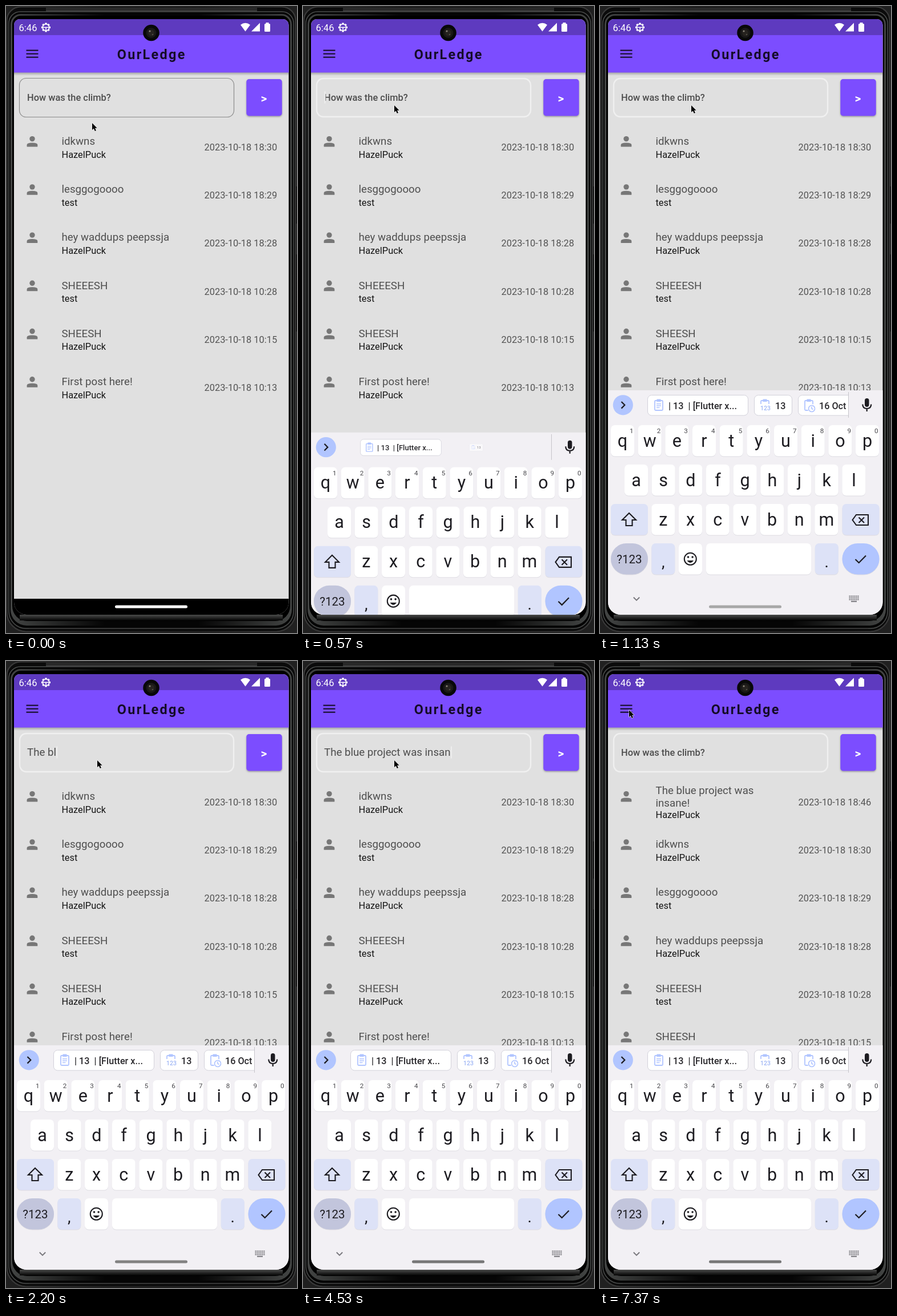
Animation of 510 by 1098 pixels, one loop 7.73 s. Source, as an HTML page with a canvas:

```html
<!DOCTYPE html>
<html lang="en">
<head>
<meta charset="utf-8">
<title>Climb feed</title>
<style>
html, body { margin: 0; width: 100%; height: 100%; overflow: hidden; background: #1d1d1d; }
canvas { display: block; width: 510px; height: 1098px; }
</style>
</head>
<body>
<canvas id="stage" width="510" height="1098"></canvas>
<script>
const ctx = document.getElementById('stage').getContext('2d');
const LOOP = 7730;
const PURPLE = '#7c4dff', INK = '#1d1c21', BLUE = '#b1c5ff', PALE = '#dde2f7';

const MESSAGE = 'The blue project was insane!';
const KEY_TIMES = [
  1500, 1600, 1700, 1800, 2000, 2200, 2300, 2400, 2530,
  2770, 2900, 3030, 3130, 3230, 3330, 3430, 3630, 3700,
  3800, 3900, 4030, 4170, 4270, 4370, 4430, 4500, 4700, 4900];
const CLEARED = 5770, POSTED = 5870, FOCUSED = 300;

const USER = 'HazelPuck';
const POSTS = [
  [['idkwns'], USER, '18:30'],
  [['lesggogoooo'], 'test', '18:29'],
  [['hey waddups peepssja'], USER, '18:28'],
  [['SHEEESH'], 'test', '10:28'],
  [['SHEESH'], USER, '10:15'],
  [['First post here!'], USER, '10:13']];
const NEW_POST = [['The blue project was', 'insane!'], USER, '18:46'];

const clamp = v => Math.max(0, Math.min(1, v));
const span = (t, from, to) => clamp((t - from) / (to - from));
const lerp = (a, b, p) => a + (b - a) * p;
const smooth = p => p * p * (3 - 2 * p);
const curve = (a, b, c, p) => [0, 1].map(i =>
  (1 - p) ** 2 * a[i] + 2 * p * (1 - p) * b[i] + p * p * c[i]);

function rect(x, y, w, h, fill) {
  ctx.fillStyle = fill;
  ctx.fillRect(x, y, w, h);
}

function box(x, y, w, h, r, fill, stroke, line = 1) {
  ctx.beginPath();
  ctx.roundRect(x, y, w, h, r);
  if (fill) { ctx.fillStyle = fill; ctx.fill(); }
  if (stroke) { ctx.strokeStyle = stroke; ctx.lineWidth = line; ctx.stroke(); }
}

function disc(x, y, r, fill) {
  ctx.beginPath();
  ctx.arc(x, y, r, 0, Math.PI * 2);
  ctx.fillStyle = fill;
  ctx.fill();
}

function path(d, x, y, scale, fill, stroke, line = 2) {
  ctx.save();
  ctx.translate(x, y);
  ctx.scale(scale, scale);
  const shape = new Path2D(d);
  if (fill) { ctx.fillStyle = fill; ctx.fill(shape); }
  if (stroke) { ctx.strokeStyle = stroke; ctx.lineWidth = line; ctx.stroke(shape); }
  ctx.restore();
}

function text(str, x, y, size, color, weight = 400, align = 'left') {
  ctx.font = `${weight} ${size}px Roboto, sans-serif`;
  ctx.textAlign = align;
  ctx.fillStyle = color;
  ctx.fillText(str, x, y);
}

function gradient(x0, y0, x1, y1, ...colors) {
  const g = ctx.createLinearGradient(x0, y0, x1, y1);
  colors.forEach((c, i) => g.addColorStop(i / (colors.length - 1), c));
  return g;
}

function drawPhone() {
  rect(0, 0, 510, 1098, '#202020');
  rect(506, 316, 4, 65, '#090909');
  rect(506, 435, 4, 135, '#090909');
  const rim = gradient(0, 0, 510, 0, '#3c3c3c', '#202020', '#202020', '#3c3c3c');
  box(1.5, 1.5, 506, 1094, [24, 24, 34, 34], '#0b0b0b', rim, 2);
  rect(70, 3, 370, 5, '#292929');
  rect(70, 8, 370, 1, '#484848');
  box(5, 10, 499, 1080, [20, 20, 30, 30], '#050505', '#4b4d4c', 1.5);
  box(8, 14, 493, 1071, [18, 18, 28, 28],
    gradient(8, 0, 501, 0, '#434544', '#050505', '#050505', '#434544'));
  box(11, 17, 487, 1060, [15, 15, 26, 26], '#000');
  rect(24, 1066, 461, 10, gradient(0, 1066, 0, 1076, '#4a4b4a', '#050505'));
  rect(40, 1089, 430, 2, '#363636');
}

function drawStatusBar() {
  rect(14, 23, 482, 28, '#5e3abf');
  text('6:46', 22.5, 44, 16.6, '#fff');

  ctx.save();
  ctx.translate(70, 37.5);
  for (let i = 0; i < 8; i++) {
    ctx.rotate(Math.PI / 4);
    rect(-1.7, -8, 3.4, 3, '#fff');
  }
  ctx.restore();
  ctx.beginPath();
  ctx.arc(70, 37.5, 5.7, 0, Math.PI * 2);
  ctx.strokeStyle = '#fff';
  ctx.lineWidth = 1.6;
  ctx.stroke();
  rect(65, 36.7, 10, 1.5, '#fff');
  rect(69.3, 37, 1.5, 5, '#fff');

  path('M411 33Q419.5 26.5 428 33L419.5 44.5Z', 0, 0, 1, '#fff');
  path('M445 29.5V44.5H430Z', 0, 0, 1, '#fff');
  box(453, 31, 10, 14, 1.5, '#fff');
  rect(455.5, 29, 5, 3, '#fff');
}

function drawAppBar() {
  rect(14, 116, 482, 6, gradient(0, 116, 0, 122, 'rgba(0,0,0,.28)', 'rgba(0,0,0,0)'));
  rect(14, 51, 482, 65.5, PURPLE);
  for (let i = 0; i < 3; i++) rect(35.5, 76.6 + i * 6, 21, 2.2, '#1a1030');
  ctx.letterSpacing = '2.34px';
  text('OurLedge', 255.3, 92.5, 23.4, '#150c28', 700, 'center');
  ctx.letterSpacing = '0px';
}

function drawCamera() {
  disc(254.5, 47, 14.3, '#080808');
  disc(254.5, 47, 9, '#191817');
  disc(254.5, 47, 5.5, '#26231f');
  disc(252, 44, 1.6, '#8a857a');
  disc(257, 50, 1.3, '#4d4b43');
}

function caretVisible(t, typed) {
  if (t >= CLEARED) return t >= POSTED && Math.floor((t - POSTED) / 500) % 2 === 0;
  if (typed) return t - KEY_TIMES[typed - 1] < 500;
  return t >= 330 && t < 800 || t >= 1300;
}

function drawComposer(t) {
  if (t < FOCUSED) box(23.5, 126.5, 376, 68, 11.7, null, '#8b8b8b', 1.2);
  else box(24, 127, 375, 67, 11.7, null, '#f0f0f0', 2.3);

  const typed = t < CLEARED ? KEY_TIMES.filter(k => k <= t).length : 0;
  const shown = MESSAGE.slice(0, typed);
  if (typed) text(shown, 37, 166, 18.7, '#4d4d4d');
  else text('How was the climb?', 37, 165.5, 16.4, '#4c4c4c', 500);
  if (caretVisible(t, typed)) {
    ctx.font = '400 18.7px Roboto, sans-serif';
    rect(37.3 + ctx.measureText(shown).width, 149.5, 2.2, 21, '#ededed');
  }

  ctx.save();
  ctx.shadowColor = 'rgba(0,0,0,.3)';
  ctx.shadowBlur = 3;
  ctx.shadowOffsetY = 1.5;
  box(421.3, 128, 62.4, 64.5, 4.7, PURPLE);
  ctx.restore();
  text('>', 452, 169, 21, '#fff', 700, 'center');
}

function drawPosts(t) {
  const posts = t >= POSTED ? [NEW_POST, ...POSTS] : POSTS;
  posts.forEach(([lines, user, time], i) => {
    const y = i * 84.24;
    disc(46, 232.6 + y, 4.7, '#777');
    path('M0 6V3.2Q0 0 8 0Q16 0 16 3.2V6Z', 36.6, 239.6 + y, 1.17, '#777');
    const tall = lines.length > 1;
    lines.forEach((line, n) => text(line, 97.5, (tall ? 233 : 242.8) + n * 22 + y, 18.7, '#4f4f4f'));
    text(user, 97.5, (tall ? 275 : 265.5) + y, 16.4, '#151515');
    text(`2023-10-18 ${time}`, 347.5, 253 + y, 16.4, '#545454');
  });
}

function drawClipboard(x, kind) {
  box(x - 7, 691, 14, 17, 1.5, null, BLUE, 1.8);
  rect(x - 3.5, 688.5, 7, 4.5, BLUE);
  if (kind === 'lines') for (let i = 0; i < 3; i++) rect(x - 4, 696 + i * 3.3, i < 2 ? 8 : 5.5, 1.5, BLUE);
  if (kind === 'digits') {
    rect(x - 9, 697, 20, 13, '#fff');
    text('123', x + 1, 708, 10.5, '#9fb6f5', 500, 'center');
  }
  if (kind === 'clock') {
    disc(x + 5, 704.5, 7.5, '#fff');
    path('M10.5 4.5A5.5 5.5 0 1 1 10.49 4.4M5 1.5V5L7.5 6.5', x, 700, 1, null, BLUE, 1.6);
  }
}

function drawChips(t) {
  const chips = [
    [83, 177, '| 13  | [Flutter x...', 120, 103, 'lines'],
    [270, 67, '13', 307, 289, 'digits'],
    [347, 109, '16 Oct', 384, 366, 'clock']];
  ctx.save();
  ctx.beginPath();
  ctx.rect(75, 673, 361, 52);
  ctx.clip();
  chips.forEach(([x, w, label, labelX, iconX, kind], i) => {
    const start = 476 + i * 60;
    const grow = 1 - (1 - span(t, start, start + 170)) ** 2;
    if (!grow) return;
    ctx.save();
    ctx.globalAlpha = Math.min(1, grow * 1.3);
    ctx.translate(x + w / 2, 699.3);
    ctx.scale(grow, grow);
    ctx.translate(-x - w / 2, -699.3);
    box(x + .5, 681.5, w - 1, 35.5, 7, '#fff', '#d2d1da');
    drawClipboard(iconX, kind);
    text(label, labelX, 705.5, 16.2, '#29282c', 500);
    ctx.restore();
  });
  ctx.restore();
}

function drawKey(cx, y, w, label, fill = '#fff', r = 7) {
  box(cx - w / 2, y + 1, w, 54.5, r, '#dddce2');
  box(cx - w / 2, y, w, 54.5, r, fill);
  if (label) text(label, cx, y + 37.5, 30.5, INK, 400, 'center');
}

function drawKeyboard(t) {
  const lift = 1 - (1 - span(t, 430, 760)) ** 3;
  if (!lift) return;
  const pitch = 47.67, w = 41;
  ctx.save();
  ctx.translate(0, 393 * (1 - lift));
  rect(14, 673, 482, 393, '#f2f0f4');

  disc(40.3, 698.8, 17.6, BLUE);
  path('M37.5 693L43.3 698.8L37.5 704.6', 0, 0, 1, null, INK, 2.2);
  drawChips(t);
  rect(435, 676, 1, 45, '#c6c5ca');
  box(464, 687, 7.5, 15, 3.75, INK);
  path('M460.3 697.5Q460.3 705 467.7 705Q475.2 705 475.2 697.5M467.7 705V710', 0, 0, 1, null, INK, 2.2);

  [...'qwertyuiop'].forEach((c, i) => {
    const x = 39.5 + i * pitch;
    drawKey(x, 734, w, c);
    text((i + 1) % 10, x + 15.8, 748.3, 11.7, '#46454a', 400, 'center');
  });
  [...'asdfghjkl'].forEach((c, i) => drawKey(63.5 + i * pitch, 803, w, c));
  [...'zxcvbnm'].forEach((c, i) => drawKey(110.8 + i * pitch, 872, w, c));

  drawKey(51.5, 872, 65, '', PALE);
  path('M51 888L63 900H56.5V910H45.5V900H39Z', 0, 0, 1, null, INK, 2.1);
  drawKey(457, 872, 65, '', PALE);
  path('M449 891H470V909H449L442.5 900ZM453.5 895.5L463 905M463 895.5L453.5 905', 0, 0, 1, null, INK, 2.1);

  drawKey(51.5, 941, 65, '', '#c2c5dc', 27);
  text('?123', 51.5, 976, 20.5, INK, 400, 'center');
  drawKey(110.8, 941, w, '', PALE);
  text(',', 110.8, 983, 28, INK, 400, 'center');
  drawKey(158.5, 941, w);
  ctx.beginPath();
  ctx.arc(158.3, 968.3, 10.5, 0, Math.PI * 2);
  ctx.strokeStyle = INK;
  ctx.lineWidth = 2.1;
  ctx.stroke();
  disc(154.5, 965, 1.8, INK);
  disc(162.1, 965, 1.8, INK);
  path('M152.5 971Q158.3 979 164.1 971Z', 0, 0, 1, INK);
  drawKey(278, 941, 184);
  drawKey(397.3, 941, w, '', PALE);
  text('.', 397.3, 983, 28, INK, 400, 'center');
  drawKey(457, 941, 65, '', BLUE, 27);
  path('M447.5 969L453.7 975L466 962.5', 0, 0, 1, null, INK, 2.2);

  path('M58.8 1035.5L64 1040.7L69.2 1035.5', 0, 0, 1, null, '#77767b', 1.8);
  for (let row = 0; row < 3; row++)
    for (let col = 0; col < 6; col++) rect(436.5 + col * 3, 1032.5 + row * 3, 2, 2, '#77767b');
  rect(440, 1041.7, 10, 2, '#77767b');
  ctx.restore();
}

function drawNavigation(t) {
  if (t < 430) rect(14, 1038, 482, 28, '#000');
  drawKeyboard(t);
  const shade = t < 1000 ? 255 : Math.round(lerp(167, 119, span(t, 1130, 2530)));
  box(191, 1049.6, 127, 5, 2.5, `rgb(${shade},${shade},${shade})`);
}

function pointerAt(t) {
  const rest = [160, 174], send = [453, 167], turn = [131, 277], menu = [51, 86];
  if (t < 5170) return curve([151, 205], [156, 190], rest, t < 30 ? 0 : span(t, 0, 100));
  if (t < 6130) return curve(rest, [315, 122], send, smooth(span(t, 5140, 5500)));
  if (t < 6900) return curve(send, [275, 342], turn, smooth(span(t, 6130, 6930)));
  return curve(turn, [85, 180], menu, 1 - (1 - span(t, 6890, 7130)) ** 2);
}

function drawPointer(t) {
  const [x, y] = pointerAt(t);
  ctx.lineJoin = 'round';
  path('M0 0V12L2.8 9.4L4.9 14L6.9 13L4.9 8.7H8.6Z', x, y, 1, '#000', '#eee', 1.2);
  path('M0 0V12L2.8 9.4L4.9 14L6.9 13L4.9 8.7H8.6Z', x, y, 1, '#000');
  ctx.lineJoin = 'miter';
}

function draw(now) {
  const t = now % LOOP;
  drawPhone();
  ctx.save();
  ctx.beginPath();
  ctx.roundRect(14, 23, 481.5, 1043, [10, 10, 22, 22]);
  ctx.clip();
  rect(14, 23, 482, 1043, '#e0e0e0');
  drawAppBar();
  drawStatusBar();
  drawComposer(t);
  drawPosts(t);
  drawNavigation(t);
  ctx.restore();
  drawCamera();
  drawPointer(t);
}

const begin = performance.now();
function tick() {
  draw(performance.now() - begin);
  requestAnimationFrame(tick);
}
tick();
</script>
</body>
</html>
```
